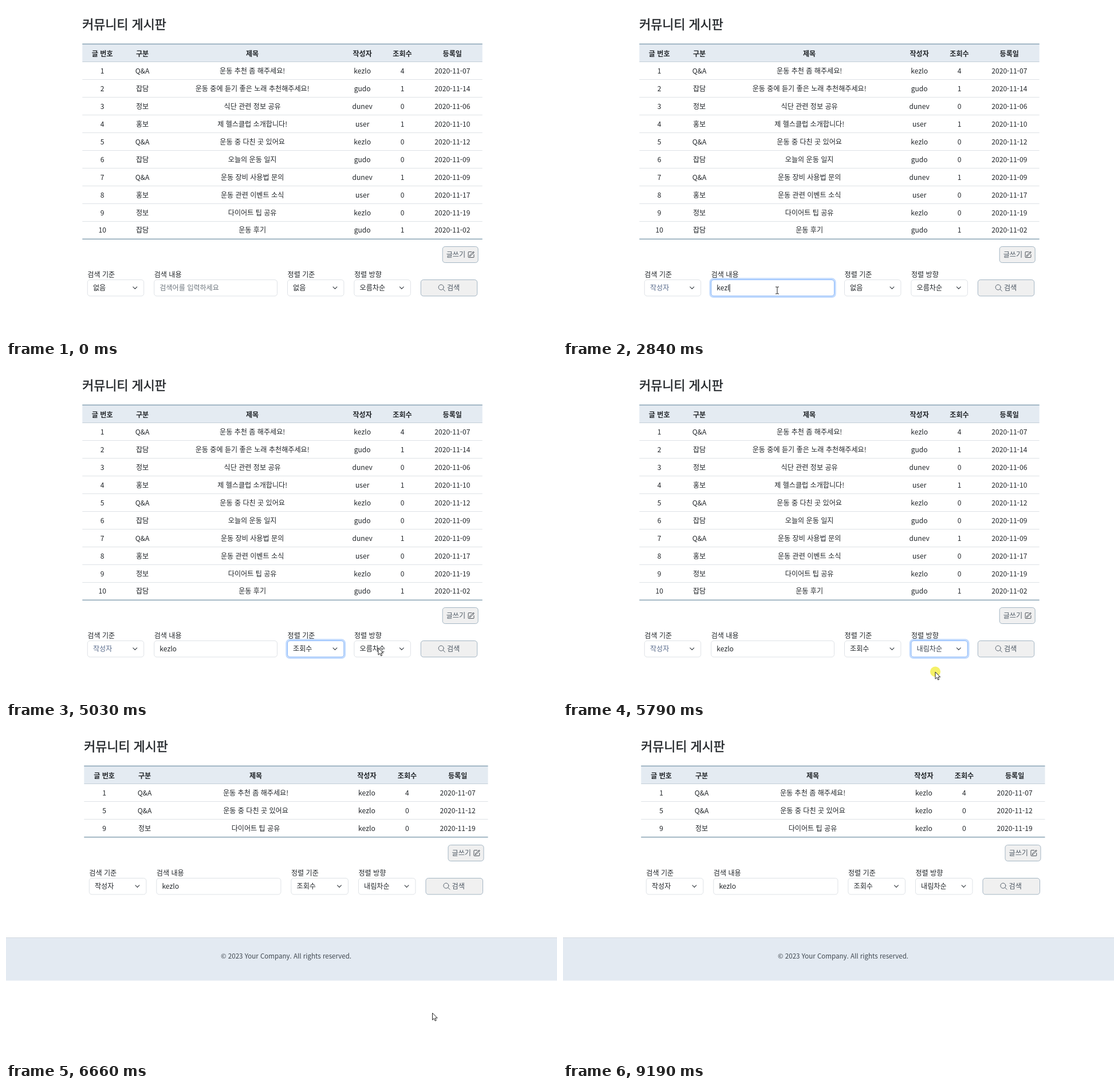
An HTML page for the animation above (9.78 s loop, 962x582 px).

```html
<!DOCTYPE html>
<html lang="ko">
<head>
<meta charset="utf-8">
<style>
  html, body { margin: 0; width: 100%; height: 100%; overflow: hidden; background: #fff; }
  svg { display: block; width: 962px; height: 582px; font: 12.1px "Noto Sans CJK KR", "Noto Sans", sans-serif; }
  text { white-space: pre; }
  .menu { filter: drop-shadow(0 1px 2px rgba(0, 0, 0, .35)); }
</style>
</head>
<body>
<svg id="stage" lang="ko" viewBox="0 0 962 582"></svg>
<script>
const LOOP = 9780, INK = '#212529', RULE = '#87a2b3', ROW = 30.95;
const stage = document.getElementById('stage');
const pen = document.createElement('canvas').getContext('2d');

const heads = ['글 번호', '구분', '제목', '작성자', '조회수', '등록일'];
const centers = [.05, .15, .425, .7, .8, .925];
const posts = [
  ['Q&amp;A', '운동 추천 좀 해주세요!', 'kezlo', 4, '07'],
  ['잡담', '운동 중에 듣기 좋은 노래 추천해주세요!', 'gudo', 1, '14'],
  ['정보', '식단 관련 정보 공유', 'dunev', 0, '06'],
  ['홍보', '제 헬스클럽 소개합니다!', 'user', 1, '10'],
  ['Q&amp;A', '운동 중 다친 곳 있어요', 'kezlo', 0, '12'],
  ['잡담', '오늘의 운동 일지', 'gudo', 0, '09'],
  ['Q&amp;A', '운동 장비 사용법 문의', 'dunev', 1, '09'],
  ['홍보', '운동 관련 이벤트 소식', 'user', 0, '17'],
  ['정보', '다이어트 팁 공유', 'kezlo', 0, '19'],
  ['잡담', '운동 후기', 'gudo', 1, '02']
].map(([kind, title, author, views, day], i) => [i + 1, kind, title, author, views, '2020-11-' + day]);

// col/span in twelfths of the width; open..close: menu, open..blur: focus
const fields = [
  { label: '검색 기준', col: 0, span: 2, open: 950, close: 1630, blur: 2370, picked: 1, tint: '#5a6c8d',
    options: ['없음', '작성자', '제목', '내용'] },
  { label: '검색 내용', col: 2, span: 4, open: 2370, blur: 3550 },
  { label: '정렬 기준', col: 6, span: 2, open: 3550, close: 4490, blur: 5300, picked: 3, tint: INK,
    options: ['없음', '작성자', '제목', '조회수'] },
  { label: '정렬 방향', col: 8, span: 2, open: 5300, close: 5790, blur: 6520, picked: 1, tint: '#3a4350',
    options: ['오름차순', '내림차순'] }
];
const clicks = [950, 1560, 2370, 3550, 4420, 5300, 5720, 6520];
const SEARCHED = 6660;

// time, x, y of the pointer tip
const path = [
  [130, 656, 572], [800, 192, 494], [950, 190, 494], [1160, 198, 526], [1300, 199, 532], [1630, 199, 532],
  [2300, 374, 497], [2930, 374, 497], [3450, 540, 494], [3550, 540, 495], [3660, 538, 509], [4350, 528, 568],
  [4490, 528, 568], [5030, 650, 491], [5300, 652, 492], [5460, 650, 533], [5790, 650, 533], [6120, 744.5, 498],
  [6790, 744.5, 498], [7490, 711, 110], [8090, 711, 110], [8160, 702, 107], [8910, 702, 107], [9190, 921, 577]
];

const clamp = v => Math.max(0, Math.min(1, v));
const rect = (x, y, w, h, fill, more = '') =>
  `<rect x="${x}" y="${y}" width="${w}" height="${h}" fill="${fill}" ${more}/>`;
const text = (x, mid, s, fill = INK, more = '', size = 12.1) =>
  `<text x="${x}" y="${mid + size * .36}" fill="${fill}" font-size="${size}" ${more}>${s}</text>`;
const icon = (x, y, scale, d, color, width) =>
  `<path transform="translate(${x} ${y}) scale(${scale})" d="${d}" fill="none" stroke="${color}" stroke-width="${width}" stroke-linecap="round" stroke-linejoin="round"/>`;
const box = (x, y, w, h, fill, stroke) => rect(x, y, w, h, fill, `rx="4.5" stroke="${stroke}"`);
const MIDDLE = 'text-anchor="middle"';
const CHEVRON = 'M2 5l6 6 6-6';
const PENCIL = 'M14.5 8v5.5a1 1 0 0 1-1 1h-11a1 1 0 0 1-1-1v-11a1 1 0 0 1 1-1H9M4.6 11.6l.9-2.7 8-8 1.7 1.7-8 8zM11.9 2.5l1.7 1.7';
const LENS = 'M12.5 6.5a6 6 0 1 1-12 0a6 6 0 1 1 12 0M10.9 10.9l4.4 4.4';

function pointerAt(t) {
  const i = path.findIndex(p => p[0] > t);
  if (i < 1) return null;
  const [a, b] = [path[i - 1], path[i]];
  const u = (t - a[0]) / (b[0] - a[0]), k = u * u * (3 - 2 * u);
  return { x: a[1] + (b[1] - a[1]) * k, y: a[2] + (b[2] - a[2]) * k };
}

function pointer({ x, y }, kind) {
  const shapes = {
    arrow: '<path d="M0 0V12.2l2.8-2.6 1.9 4.3 2-.9-1.9-4.1h3.9z" fill="#fff" stroke="#222"/>',
    beam: '<path d="M-3-6h2q1 0 1 1 0-1 1-1h2M0-5V5M-3 6h2q1 0 1-1 0 1 1 1h2" fill="none" stroke="#222"/>',
    hand: '<path d="M-1.2 10V1.2a1.3 1.3 0 0 1 2.6 0V6q2.4-.8 2.6.6 2.2-.6 2.4.8 1.9-.3 1.9 1.4v3.4q0 2-1.4 3.2v1.6H0v-1.4L-4.2 10.6q-.8-1.8.9-1.9z" fill="#fff" stroke="#222"/>'
  };
  return `<g transform="translate(${x.toFixed(2)} ${y.toFixed(2)})">${shapes[kind]}</g>`;
}

function table(X, W, list, end) {
  // a hairline stroke gives the title its medium weight
  let s = text(X, 32, '커뮤니티 게시판', INK, `stroke="${INK}" stroke-width=".5"`, 21.8);
  s += rect(X, 66, W, 31, '#e4ebf2') + rect(X, 65.7, W, 1.5, RULE) + rect(X, 97, W, 1, '#c3ced7');
  centers.forEach((c, k) => s += text(X + c * W, 83.4, heads[k], INK, MIDDLE + ' font-weight="700"'));
  list.forEach((post, i) => {
    post.forEach((cell, k) => s += text(X + centers[k] * W, 114 + 30.9 * i, cell, INK, MIDDLE));
    if (i) s += rect(X, Math.round(97.3 + ROW * i), W, 1, '#dee2e6');
  });
  return s + rect(X, end - .2, W, 1.5, RULE);
}

function field(f, X, W, y, t, done, tip) {
  const x = X + f.col * W / 12 + 9, w = f.span * W / 12 - 18, h = 28.4, mid = y + 14.5;
  const glow = done ? 0 : clamp((t - f.open) / 150) * clamp(1 - (t - f.blur) / 80);
  let s = text(x, y - 8.4, f.label) + box(x, y, w, h, '#fff', '#dee2e6');
  if (glow) {
    s += rect(x - 1.8, y - 1.8, w + 3.6, h + 3.6, 'none', `rx="6" stroke="#c2dbfe" stroke-width="2.8" opacity="${glow}"`);
    s += rect(x, y, w, h, 'none', `rx="4.5" stroke="#86b7fe" opacity="${Math.min(1, glow * 3)}"`);
  }
  if (!f.options) {
    const typed = 'kezlo'.slice(0, t < 2700 ? 0 : Math.floor((t - 2560) / 70));
    s += typed ? text(x + 9.6, mid, typed) : text(x + 9.6, mid, '검색어를 입력하세요', '#6c757d');
    if (t >= f.open && t < f.blur) {
      pen.font = getComputedStyle(stage).font;
      s += rect(x + 9.6 + pen.measureText(typed).width, mid - 7, 1, 14, INK);
    }
    return s;
  }
  const chosen = t >= f.close;
  s += text(x + 9.6, mid, f.options[chosen ? f.picked : 0], chosen && !done ? f.tint : INK);
  s += icon(x + w - 20, y + 9.6, .568, CHEVRON, '#343a40', 2);
  if (t >= f.open && t < f.close) {
    const top = 508, step = 19, n = f.options.length;
    const hot = Math.max(0, Math.min(n - 1, Math.floor((tip.y - top) / step)));
    s += rect(x + .5, top - .5, w - 1, n * step + 1, '#fff', 'stroke="#767676" class="menu"');
    s += rect(x + 1, top + hot * step, w - 2, step, '#1967d2');
    f.options.forEach((o, i) => s += text(x + 9.6, top + 10 + i * step, o, i === hot ? '#fff' : INK));
  }
  return s;
}

function scene(t) {
  const done = t >= SEARCHED, tip = pointerAt(t);
  const [X, W] = done ? [136.3, 705.2] : [133.3, 698.4];
  const list = done ? posts.filter(p => p[3] === 'kezlo') : posts;
  const end = 97.3 + ROW * list.length, y = Math.round(end + 71.5) + .5;
  const over = (x, w) => !done && tip && tip.x > x && tip.x < x + w && tip.y > y && tip.y < y + 28;
  let s = table(X, W, list, end);

  const writeX = X + W - 69.5, writeY = Math.round(end + 13.4) + .5;
  s += box(writeX, writeY, 62, 28, '#f0f0f0', '#a3b5c3') + text(writeX + 6.5, writeY + 14.6, '글쓰기', '#525d68');
  s += icon(writeX + 43.8, writeY + 8, .756, PENCIL, '#353c44', 1.2);

  const menus = fields.map(f => field(f, X, W, y, t, done, tip));
  const bx = X + W * 5 / 6 + 9, bw = W / 6 - 18, hover = over(bx, bw);
  const ink = hover ? INK : '#495460';
  s += box(bx, y, bw, 28.4, hover ? '#e4ebf0' : '#f0f0f0', hover ? '#8ba6b6' : '#a3b5c3');
  s += icon(bx + 30.5, y + 8.2, .756, LENS, ink, 1.2) + text(bx + 45.6, y + 14.5, '검색', ink);
  s += menus.join('');

  if (done) {
    s += rect(0, 366, 962, 75.5, '#e3eaf2') + rect(0, 366, 962, 1, '#d3dae0');
    s += text(489, 399, '© 2023 Your Company. All rights reserved.', '#3f474f', MIDDLE, 11.55);
  }
  if (tip) {
    if (clicks.some(c => t >= c && t < c + 140))
      s += `<circle cx="${tip.x}" cy="${tip.y - .5}" r="9" fill="#f3ee4e" opacity=".85"/>`;
    const inputX = X + W / 6 + 9;
    s += pointer(tip, hover ? 'hand' : over(inputX, W / 3 - 18) ? 'beam' : 'arrow');
  }
  return s;
}

let shown = '';
function frame() {
  const next = scene(performance.now() % LOOP);
  if (next !== shown) stage.innerHTML = shown = next;
  requestAnimationFrame(frame);
}
frame();
</script>
</body>
</html>
```
